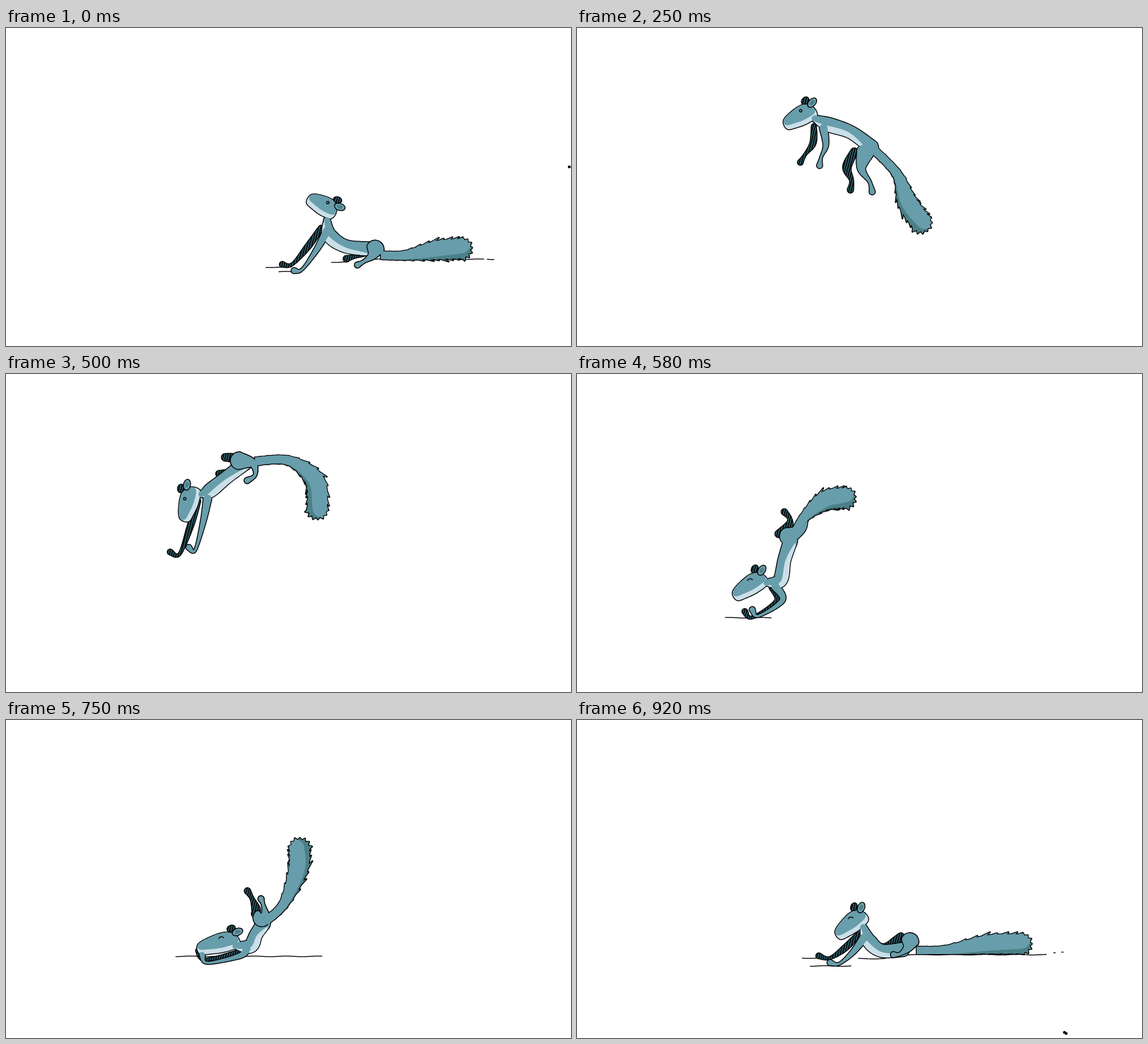
These frames come from a looping animation (998 px wide and 561 px high, 1.01 s). An HTML page with a canvas:

```html
<!DOCTYPE html>
<html lang="en">
<head>
<meta charset="utf-8">
<title>Squirrel leap</title>
<style>
  html, body { margin: 0; width: 100%; height: 100%; overflow: hidden; background: #fff; }
  canvas { display: block; }
</style>
</head>
<body>
<canvas id="stage" width="998" height="561"></canvas>
<script>
const ctx = document.getElementById('stage').getContext('2d');
const FUR = '#689dab', SHADE = '#4c7f87', LIGHT = '#cadfe8', DARK = '#2f606b', INK = '#000';
const LOOP = 1010, FLOOR = 413;

// Half widths along each part, from root to end.
const WIDTH = {
  body: [6, 12, 11, 12],
  arm: [7, 4.5, 2, 4.8], farArm: [4, 5, 2, 4.5],
  leg: [15, 7, 2.6, 4.8], farLeg: [6, 7, 3, 5],
  tail: [7, 8, 16, 17]
};

// Key points: head is nose and nape; the rest are four joints each.
// The far limbs copy the near ones, with the toes moved by the gap.
const crouch = {
  head: [534,300, 579,329], body: [567,340, 572,366, 600,385, 645,390],
  arm: [567,358, 548,392, 523,426, 509,428], armGap: [-21,-11],
  leg: [652,390, 646,402, 632,412, 621,418], legGap: [-20,-11],
  tail: [662,401, 705,401, 760,392, 804,389],
  ground: [459,422,505, 482,430,522, 575,413,605, 640,408,846, 850,408,863],
  specks: [995,245], haunch: true
};
const launch = {
  head: [396,155, 456,149], body: [455,156, 478,178, 518,212, 548,268],
  arm: [471,180, 476,215, 485,243, 497,259], armGap: [-40,-10],
  leg: [543,275, 539,315, 556,346, 567,369], legGap: [-43,-16],
  tail: [553,275, 582,335, 599,383, 640,394],
  ground: [543,415,548, 556,415,610, 655,410,686], specks: []
};
const glide = {
  head: [337,188, 385,147], body: [386,164, 412,163, 450,156, 492,152],
  arm: [400,172, 403,198, 378,212, 360,226], armGap: [-28,-1],
  leg: [475,165, 466,181, 478,197, 476,209], legGap: [-34,9],
  tail: [492,151, 548,180, 568,232, 575,291],
  ground: [], specks: []
};
const dive = {
  head: [314,259, 335,203], body: [346,212, 360,206, 390,182, 424,156],
  arm: [356,220, 348,262, 334,311, 323,306], armGap: [-33,8],
  leg: [412,153, 436,158, 440,178, 426,188], legGap: [-50,-12],
  tail: [440,154, 500,153, 545,187, 550,237],
  ground: [], specks: [], haunch: true
};
const headstand = {
  head: [286,407, 365,393], body: [362,397, 391,394, 384,350, 379,312],
  arm: [380,403, 406,416, 345,429, 334,414], armGap: [0,0],
  leg: [381,300, 403,277, 414,243, 417,219], legGap: [-24,-6],
  tail: [376,300, 369,245, 400,173, 455,131],
  ground: [258,417,352, 408,417,426, 431,417,439, 446,418,455], specks: [], asleep: true
};
const slump = {
  head: [391,402, 455,389], body: [450,400, 472,403, 500,406, 530,407],
  arm: [470,404, 420,416, 367,428, 359,414], armGap: [-13,-14],
  leg: [523,398, 512,408, 495,410, 484,412], legGap: [-24,-22],
  tail: [540,411, 612,404, 632,357, 582,324],
  ground: [310,416,362, 480,417,660, 667,413,670, 677,413,679], specks: [],
  haunch: true, asleep: true
};
const rise = {
  head: [459,381, 510,346], body: [506,366, 516,390, 538,407, 575,405],
  arm: [507,384, 487,410, 463,430, 447,428], armGap: [-20,-12],
  leg: [588,391, 583,403, 570,413, 559,414], legGap: [-32,-18],
  tail: [600,407, 652,406, 725,396, 784,395],
  ground: [398,420,440, 412,434,486, 497,421,545, 583,414,830, 842,411,846, 856,409,859],
  specks: [861,551, 864,553], haunch: true, asleep: true
};

// Pose between two others, moved by dx, dy.
function between(a, b, k, ground = [], dx = 0, dy = 0) {
  const pose = { ...b, ground, specks: [] };
  for (const key of ['head', 'body', 'arm', 'leg', 'tail', 'armGap', 'legGap']) {
    const move = key.endsWith('Gap') ? [0, 0] : [dx, dy];
    pose[key] = a[key].map((v, i) => v + (b[key][i] - v) * k + move[i % 2]);
  }
  return pose;
}

const timeline = [
  [0, crouch],
  [80, between(crouch, launch, .5, [640,410,765])],
  [170, launch],
  [250, between(launch, glide, .5)],
  [330, glide],
  [420, between(glide, dive, .5)],
  [500, dive],
  [580, between(dive, headstand, .6, [262,430,345], -20, 45)],
  [670, headstand],
  [750, between(headstand, slump, .5, [300,417,560])],
  [830, slump],
  [920, rise]
];

const clamp = (v, lo, hi) => Math.min(hi, Math.max(lo, v));
const noise = i => Math.abs(Math.sin(i * 12.9898) * 43758.5453) % 1;

// Smooth curve through values; the ends repeat.
function curve(values, u) {
  const i = Math.min(values.length - 2, Math.floor(u)), t = u - i;
  const [a, b, c, d] = [-1, 0, 1, 2].map(k => values[clamp(i + k, 0, values.length - 1)]);
  return b + .5 * t * (c - a + t * (2 * a - 5 * b + 4 * c - d + t * (3 * (b - c) + d - a)));
}

const split = flat => [0, 1].map(k => flat.filter((_, i) => i % 2 === k));

// Points along a part with half width w and unit normal nx, ny.
function sample(flat, widths, per = 16) {
  const [xs, ys] = split(flat), pts = [], count = (xs.length - 1) * per;
  for (let i = 0; i <= count; i++) {
    const u = i / per;
    pts.push({ x: curve(xs, u), y: curve(ys, u), w: Math.max(.5, curve(widths, u)), t: i / count });
  }
  pts.forEach((p, i) => {
    const a = pts[Math.max(0, i - 1)], b = pts[Math.min(count, i + 1)];
    p.a = Math.atan2(b.y - a.y, b.x - a.x);
    p.nx = -Math.sin(p.a);
    p.ny = Math.cos(p.a);
  });
  return pts;
}

// Copy of a part, moved sideways and scaled in proportion to its width.
const aside = (pts, shift, scale) => pts.map(p => {
  const s = shift(p.t) * p.w;
  return { ...p, x: p.x + p.nx * s, y: p.y + p.ny * s, w: p.w * scale(p.t) };
});

function tube(pts) {
  const path = new Path2D(), first = pts[0], last = pts[pts.length - 1], q = Math.PI / 2;
  for (const p of pts) path.lineTo(p.x + p.nx * p.w, p.y + p.ny * p.w);
  path.arc(last.x, last.y, last.w, last.a + q, last.a - q, true);
  for (const p of [...pts].reverse()) path.lineTo(p.x - p.nx * p.w, p.y - p.ny * p.w);
  path.arc(first.x, first.y, first.w, first.a - q, first.a + q, true);
  path.closePath();
  return path;
}

// Tail outline with uneven teeth that lean towards the tip.
function brush(pts) {
  const path = new Path2D(), last = pts[pts.length - 1];
  const to = (x, y) => path.lineTo(x, Math.min(y, FLOOR));
  const edge = (p, i, side) => {
    const tooth = i % 4 === 3 ? clamp((p.w - 6) * .8, 0, 6) * (.5 + noise(i + side)) : 0;
    const r = (p.w + tooth * .6) * side;
    to(p.x + p.nx * r + p.ny * tooth * 1.2, p.y + p.ny * r - p.nx * tooth * 1.2);
  };
  pts.forEach((p, i) => edge(p, i, 1));
  for (let i = 1; i < 14; i++) {
    const a = last.a + Math.PI * (.5 - i / 14), r = last.w + (i % 2 ? 2 + 4 * noise(i) : -1);
    to(last.x + Math.cos(a) * r, last.y + Math.sin(a) * r);
  }
  for (let i = pts.length - 1; i >= 0; i--) edge(pts[i], i, -1);
  path.closePath();
  return path;
}

function oval(x, y, rx, ry = rx, angle = 0) {
  const path = new Path2D();
  path.ellipse(x, y, rx, ry, angle, 0, 7);
  return path;
}

function fill(path, color) {
  ctx.fillStyle = color;
  ctx.fill(path);
}

function ink(path, width = 3) {
  ctx.lineWidth = width;
  ctx.stroke(path);
}

function inside(path, paint) {
  ctx.save();
  ctx.clip(path);
  paint();
  ctx.restore();
}

function hatched(path) {
  ink(path);
  fill(path, DARK);
  inside(path, () => {
    const lines = new Path2D();
    for (let x = 0; x < 1200; x += 4) {
      lines.moveTo(x, 0);
      lines.lineTo(x - 140, 561);
    }
    ink(lines, 1.8);
  });
}

// Head wedge and face, placed by nose and nape.
function makeHead([x0, y0, x1, y1]) {
  const angle = Math.atan2(y1 - y0, x1 - x0), length = Math.hypot(x1 - x0, y1 - y0);
  const cos = Math.cos(angle), sin = Math.sin(angle);
  const at = (u, up) => [x0 + cos * u * length + sin * up, y0 + sin * u * length - cos * up];
  const shape = [[.03, 8], [.36, 17], [.75, 20], [1, 9], [1, -8], [.66, -13], [.3, -12], [.03, -8]];
  const loop = [...shape.slice(-2), ...shape, ...shape.slice(0, 2)].map(([u, up]) => at(u, up));
  const [xs, ys] = split(loop.flat()), path = new Path2D();
  for (let u = 2; u < 10; u += .1) path.lineTo(curve(xs, u), curve(ys, u));
  path.closePath();
  const [ex, ey] = at(1.03, 17), tilt = clamp(angle * 2, -1.4, .3);
  return {
    path, lift: [sin * 8, -cos * 8], eye: at(.62, 12),
    ear: k => oval(ex, ey, 9 * k, 5.5 * k, tilt),
    farEar: oval(ex + sin * 8 - cos * 10, ey - cos * 8 - sin * 10, 7, 5, tilt)
  };
}

function drawGround(marks) {
  const path = new Path2D();
  for (let i = 0; i < marks.length; i += 3) {
    const [from, y, to] = marks.slice(i, i + 3);
    for (let x = from; x <= to; x += 3) {
      const wave = Math.sin(x / 9) * .6;
      x === from ? path.moveTo(x, y + wave) : path.lineTo(x, y + wave);
    }
  }
  ink(path, 1.5);
}

function drawEye([x, y], asleep) {
  const path = new Path2D();
  if (asleep) path.arc(x, y + 3, 5, 3.5, 5.6);
  else path.arc(x, y, 2.2, 0, 7);
  ink(path, 1.5);
}

const farLimb = (limb, gap) =>
  limb.map((v, i) => v + gap[i % 2] * (.5 + Math.floor(i / 2) / 6));

function draw(p) {
  ctx.fillStyle = '#fff';
  ctx.fillRect(0, 0, 998, 561);
  ctx.strokeStyle = INK;
  ctx.lineJoin = ctx.lineCap = 'round';

  const head = makeHead(p.head);
  const spine = sample(p.body, WIDTH.body), plume = sample(p.tail, WIDTH.tail);
  const body = tube(spine), tail = brush(plume);
  const arm = tube(sample(p.arm, WIDTH.arm)), leg = tube(sample(p.leg, WIDTH.leg));

  drawGround(p.ground);
  hatched(tube(sample(farLimb(p.arm, p.armGap), WIDTH.farArm)));
  hatched(tube(sample(farLimb(p.leg, p.legGap), WIDTH.farLeg)));
  hatched(head.farEar);
  for (const part of [tail, body, head.path, arm, leg]) ink(part);

  fill(head.path, LIGHT);
  inside(head.path, () => {
    ctx.translate(...head.lift);
    fill(head.path, FUR);
  });
  fill(body, FUR);
  const belly = aside(spine, () => .8, t => .7 * Math.sin(Math.PI * t));
  inside(body, () => fill(tube(belly), LIGHT));
  fill(arm, FUR);
  if (p.haunch) ink(leg);
  fill(leg, FUR);

  fill(tail, SHADE);
  const lit = aside(plume, t => -.5 * t, t => 1.1 - .1 * t);
  inside(tail, () => fill(tube(lit), FUR));

  ink(head.ear(1));
  fill(head.ear(1), FUR);
  fill(head.ear(.55), SHADE);
  drawEye(head.eye, p.asleep);
  for (let i = 0; i < p.specks.length; i += 2) fill(oval(p.specks[i], p.specks[i + 1], 2.5), INK);
}

let shown;
function tick() {
  const t = performance.now() % LOOP;
  const [, pose] = timeline.findLast(([start]) => start <= t);
  if (pose !== shown) draw(shown = pose);
  requestAnimationFrame(tick);
}
tick();
</script>
</body>
</html>
```
